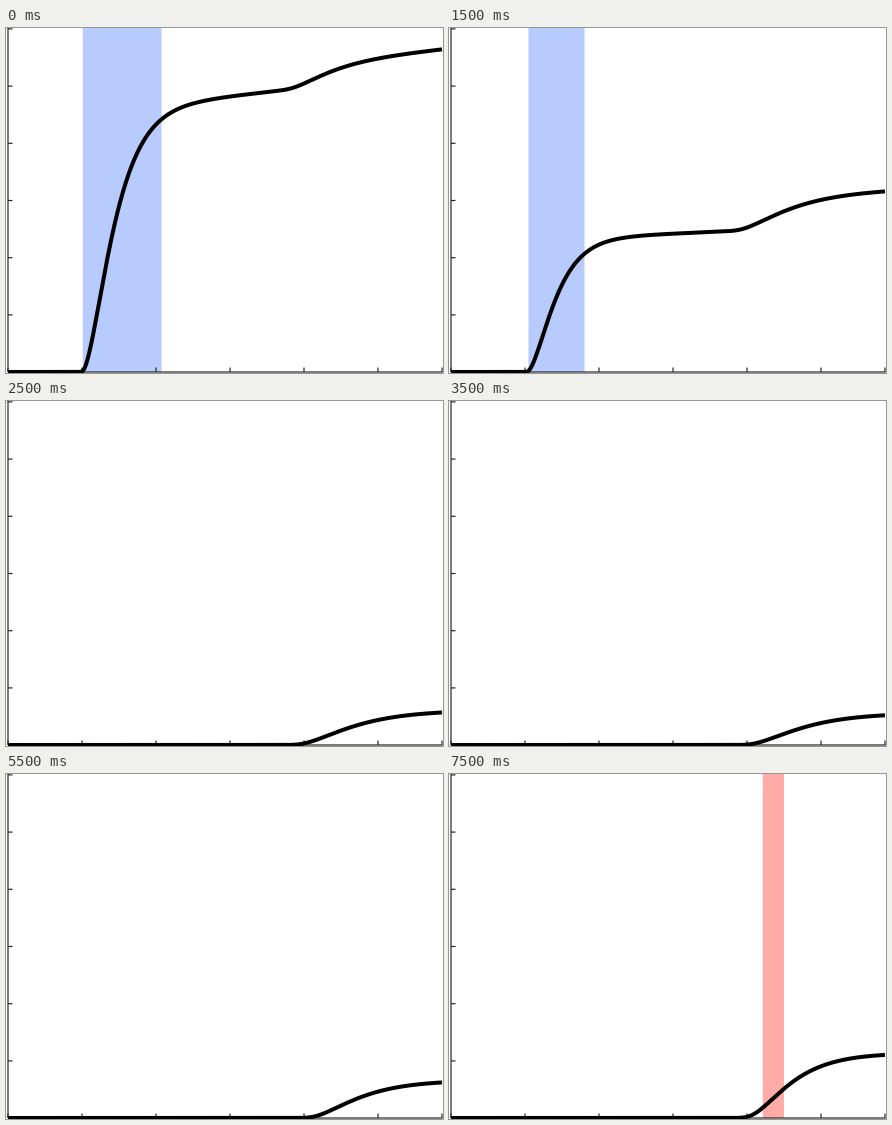
These frames come from a looping animation (437 by 345 pixels, 8000 ms). A matplotlib script:

```python
import numpy as np
import matplotlib.pyplot as plt
from matplotlib.animation import FuncAnimation
from matplotlib.patches import Rectangle

W, H, DPI = 437, 345, 100
FRAMES, STEP = 16, 500
LEFT, BASE, RIGHT = 2, 344, 436
STEEP = .84  # slope above which growth is highlighted
BLUE, RED, AXIS = "#b8cbff", "#ffaba7", "#262626"

xs = np.linspace(LEFT, RIGHT, 1737)


def px(n):
    return n * 72 / DPI


def track(k, keys):
    """Value at time k, linear between key times."""
    return np.interp(k, list(keys), list(keys.values()))


def soft_ramp(start, softness):
    """Zero before start, then distance from it, with a rounded corner."""
    return softness * np.logaddexp(0, (xs - start) / softness)


def rise(u, tau):
    """Step response of a critically damped system."""
    return 1 - (1 + u / tau) * np.exp(-u / tau)


def first_step(k):
    u = soft_ramp(track(k, {0: 75.5, 2: 76.5, 4: 78.5}), 1.2)
    tau = track(k, {0: 17.8, 2: 17.5, 4: 14.6})
    height = track(k, {0: 260, 2: 222, 4: 42.6, 5: 0})
    drift = track(k, {0: .108, 2: .084, 4: 0})
    return height * rise(u, tau) + drift * u


def second_step(k):
    u = soft_ramp(track(k, {0: 279, 5: 288, 9: 303, 15: 296}), 6)
    tau = track(k, {0: 24.5, 5: 33, 9: 31, 15: 25.5})
    if k < 5:
        height = track(k, {0: 24, 4: 38})
    else:
        height = 31.5 + (.35 if k < 8 else .68) * (k - 8) ** 2
    return height * rise(u, tau)


fig = plt.figure(figsize=(W / DPI, H / DPI), dpi=DPI, facecolor="white")
ax = fig.add_axes([0, 0, 1, 1])
ax.set(xlim=(0, W), ylim=(H, 0))
ax.axis("off")

band = ax.add_patch(Rectangle((0, 0), 0, BASE, lw=0, zorder=1, snap=False))


def rule(x, y):
    ax.plot(x, y, color=AXIS, lw=px(1.2), zorder=2, snap=False,
            solid_capstyle="butt")


rule([LEFT, LEFT], [0, BASE])
rule([LEFT, RIGHT + .5], [BASE, BASE])
for i in range(6):
    y = .9 + 57.2 * i
    rule([LEFT, 6.5], [y, y])
    x = min(LEFT + 74 * i, RIGHT)
    rule([x, x], [339.5, BASE])
rule([RIGHT, RIGHT], [339.5, BASE])

line, = ax.plot([], [], color="black", lw=px(4), zorder=3, snap=False,
                solid_capstyle="butt", solid_joinstyle="round")


def draw(k):
    height = first_step(k) + second_step(k)
    line.set_data(xs, BASE - height)
    steep = xs[np.gradient(height, xs) > STEEP]
    band.set_visible(steep.size > 0)
    if steep.size:
        band.set_x(steep[0])
        band.set_width(steep[-1] - steep[0])
        band.set_facecolor(BLUE if steep[0] < W / 2 else RED)
    return band, line


anim = FuncAnimation(fig, draw, frames=FRAMES, interval=STEP, repeat=True,
                     repeat_delay=0)
plt.show()
```
